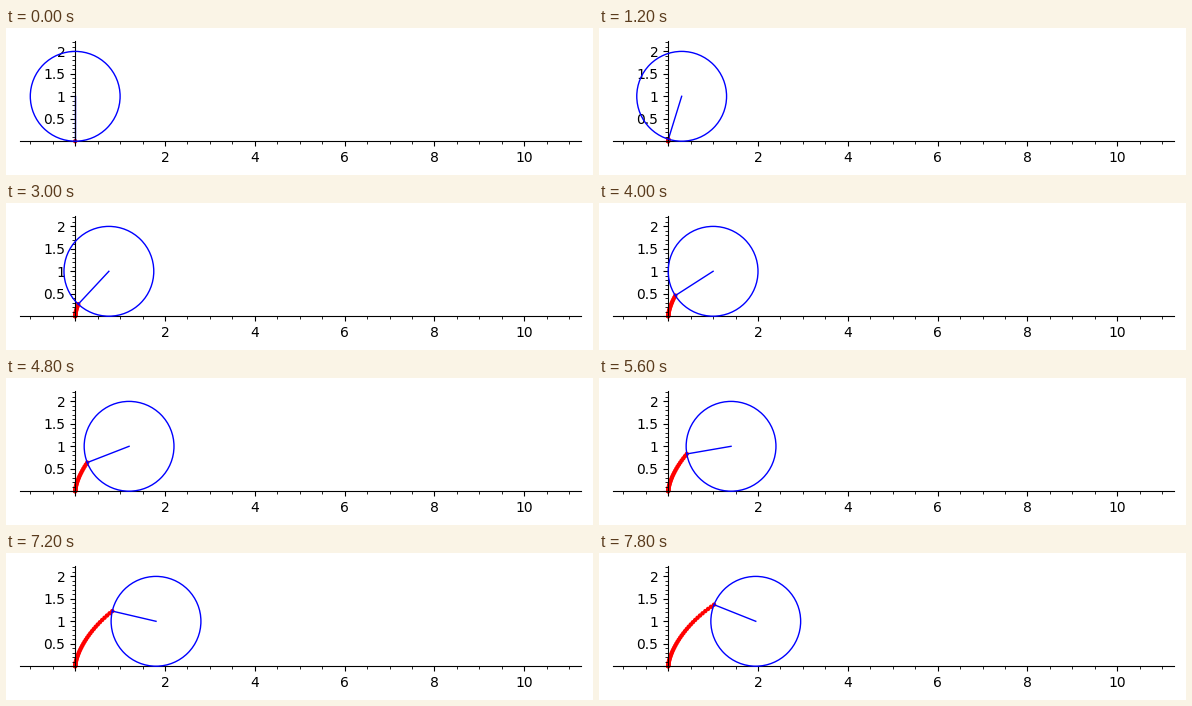
Animation, 587 px wide and 147 px high, one loop 8000 ms. Source, as a matplotlib script:

```python
import matplotlib.pyplot as plt
import numpy as np
from matplotlib.animation import FuncAnimation
from matplotlib.ticker import FuncFormatter, MultipleLocator

W, H, DPI = 587, 147, 100
UNIT = 44.9                # pixels per data unit
X0, Y0 = 69.2, 113.2       # pixel position of the data origin
LEFT, RIGHT, TOP = 14.2, 574.6, 13.0
STEP, FRAMES = 0.05, 40    # rolling angle per frame

fig = plt.figure(figsize=(W / DPI, H / DPI), dpi=DPI, facecolor="white")
ax = fig.add_axes([LEFT / W, 1 - Y0 / H, (RIGHT - LEFT) / W, (Y0 - TOP) / H])
ax.set_xlim((LEFT - X0) / UNIT, (RIGHT - X0) / UNIT)
ax.set_ylim(0, (Y0 - TOP) / UNIT)
ax.patch.set_visible(False)
ax.spines[["top", "right"]].set_visible(False)
ax.spines["left"].set_position(("data", 0))


def set_ticks(axis, major, minor):
    axis.set_major_locator(MultipleLocator(major))
    axis.set_minor_locator(MultipleLocator(minor))
    axis.set_major_formatter(FuncFormatter(lambda v, _: f"{v:g}" if v > 0.01 else ""))


set_ticks(ax.xaxis, 2, 0.5)
set_ticks(ax.yaxis, 0.5, 0.1)
ax.tick_params(labelsize=10, labelfontfamily="DejaVu Sans")

trail = ax.scatter([], [], s=10, c="red", edgecolors="none", zorder=1, clip_on=False)
spoke, = ax.plot([], [], color="blue", lw=1, zorder=2, clip_on=False)
wheel = plt.Circle((0, 1), 1, fill=False, ec="blue", lw=1, zorder=5, clip_on=False)
ax.add_patch(wheel)


def cycloid(t):
    return t - np.sin(t), 1 - np.cos(t)


def draw(i):
    t = i * STEP
    px, py = cycloid(t)
    wheel.center = (t, 1)
    spoke.set_data([t, px], [1, py])
    trail.set_offsets(np.column_stack(cycloid(np.arange(i + 1) * STEP)))
    return wheel, spoke, trail


anim = FuncAnimation(fig, draw, frames=FRAMES, interval=200, repeat=True,
                     repeat_delay=0, init_func=lambda: draw(0))
plt.show()
```
